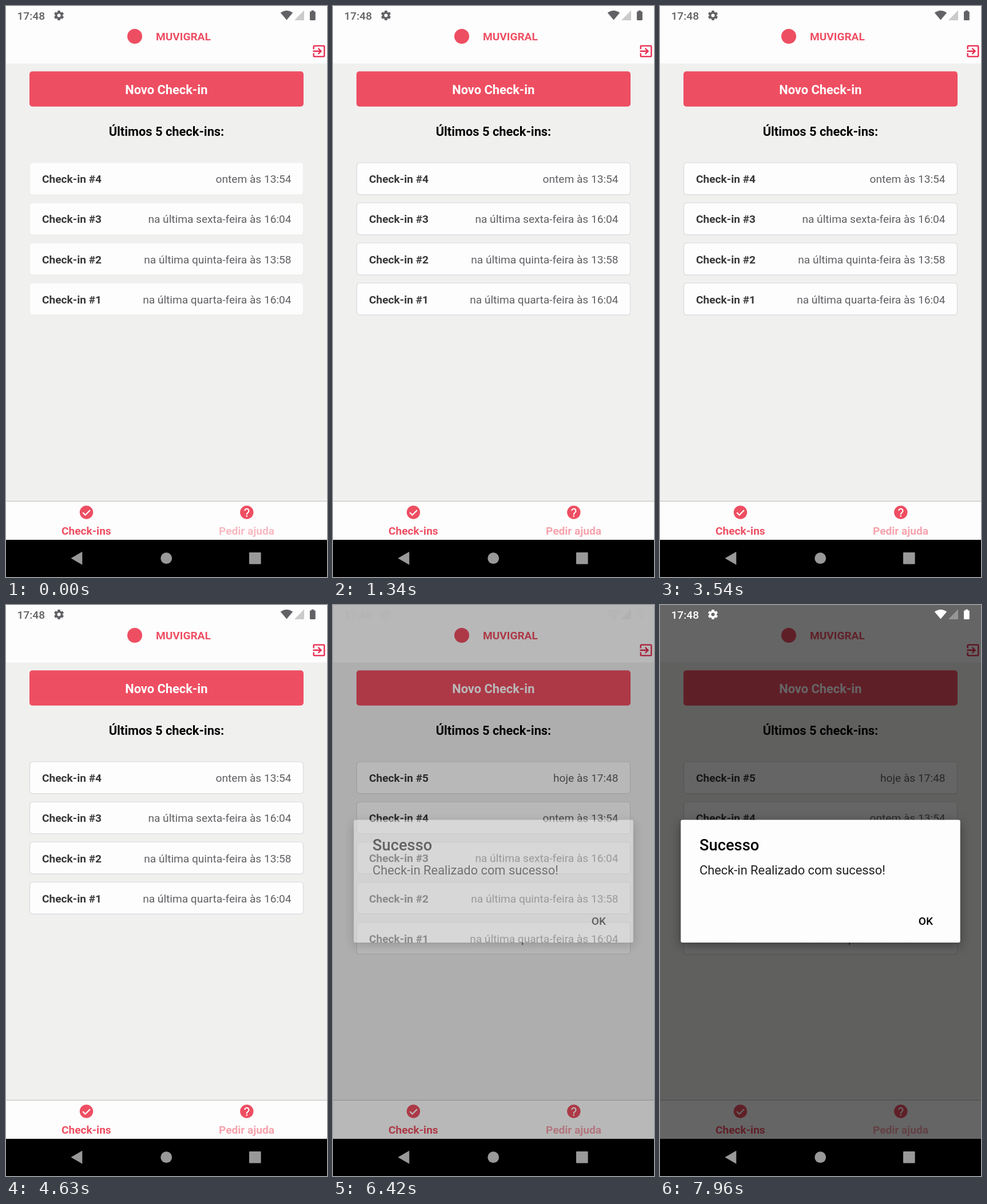
Recreate the animation shown at these times as an HTML page. Size 561x998 px, loop 8 s.

```html
<!DOCTYPE html>
<html lang="pt-BR">
<head>
<meta charset="utf-8">
<title>Check-ins</title>
<style>
  html, body { margin: 0; width: 100%; height: 100%; overflow: hidden; background: #000; }
  svg { display: block; width: 100%; height: 100%; font-family: Roboto, sans-serif; font-size: 19.11px; }
  .bold { font-weight: 700; }
  .medium { font-weight: 500; }
  .large { font-size: 21.84px; }
  .end { text-anchor: end; }
  .middle { text-anchor: middle; }
  .brand { fill: #ee4e62; }
  .card { fill: #fdfdfd; }
  .outline { fill: none; stroke: #dadade; stroke-width: 1.2; }
  #dialog rect { filter: drop-shadow(0 5px 9px rgba(0, 0, 0, .4)); }
</style>
</head>
<body>
<svg viewBox="0 0 561 998">
  <defs>
    <g id="status">
      <text class="medium" x="19.5" y="24">17:48</text>
      <path transform="translate(82.2 6.2) scale(.86)" d="M19.43 12.98c.04-.32.07-.64.07-.98s-.03-.66-.07-.98l2.11-1.65c.19-.15.24-.42.12-.64l-2-3.46c-.12-.22-.39-.3-.61-.22l-2.49 1c-.52-.4-1.08-.73-1.69-.98l-.38-2.65C14.46 2.18 14.25 2 14 2h-4c-.25 0-.46.18-.49.42l-.38 2.65c-.61.25-1.17.59-1.69.98l-2.49-1c-.23-.09-.49 0-.61.22l-2 3.46c-.13.22-.07.49.12.64l2.11 1.65c-.04.32-.07.65-.07.98s.03.66.07.98l-2.11 1.65c-.19.15-.24.42-.12.64l2 3.46c.12.22.39.3.61.22l2.49-1c.52.4 1.08.73 1.69.98l.38 2.65c.03.24.24.42.49.42h4c.25 0 .46-.18.49-.42l.38-2.65c.61-.25 1.17-.59 1.69-.98l2.49 1c.23.09.49 0 .61-.22l2-3.46c.12-.22.07-.49-.12-.64zM12 15.5a3.5 3.5 0 1 1 0-7 3.5 3.5 0 0 1 0 7z"/>
      <path d="M479.8 11.8Q490.5 4 501.2 11.8L490.5 24.6z"/>
      <path opacity=".32" d="M521 7.5V25H504z"/>
      <path d="M533.8 7.8H538V9.4H539.6Q540.8 9.4 540.8 10.6V23.8Q540.8 25 539.6 25H532.2Q531 25 531 23.8V10.6Q531 9.4 532.2 9.4H533.8z"/>
    </g>
  </defs>

  <rect width="561" height="933" fill="#f0f0ef"/>
  <rect width="561" height="100.5" fill="#fdfdfd"/>
  <use id="darkStatus" href="#status" fill="#626266"/>
  <circle class="brand" cx="225" cy="53" r="13"/>
  <text class="brand bold" x="262" y="59.8">MUVIGRAL</text>
  <path fill="#e8284e" transform="translate(533 65) scale(1.167)" d="M10.09 15.59L11.5 17l5-5-5-5-1.41 1.41L12.67 11H3v2h9.67zM19 3H5a2 2 0 0 0-2 2v4h2V5h14v14H5v-4H3v4a2 2 0 0 0 2 2h14a2 2 0 0 0 2-2V5a2 2 0 0 0-2-2z"/>

  <g id="button">
    <rect class="brand" x="41" y="114.3" width="479" height="61.4" rx="5"/>
    <text class="bold large middle" x="280.3" y="153.8" fill="#fff">Novo Check-in</text>
  </g>
  <text class="bold large middle" x="280.5" y="226.8">Últimos 5 check-ins:</text>
  <g id="list"></g>

  <rect y="865" width="561" height="68" fill="#fdfdfd"/>
  <rect y="865" width="561" height="1" fill="#bdbdbf"/>
  <g class="brand bold middle">
    <circle cx="140.5" cy="885" r="11.7"/>
    <path d="M134.2 885.3L138.6 889.7L147 881.2" fill="none" stroke="#fff" stroke-width="2.2"/>
    <text x="140.3" y="924.3">Check-ins</text>
    <circle cx="420.8" cy="885" r="11.7"/>
    <path d="M417.2 882.3a3.6 3.6 0 1 1 6 2.7q-2.4 1.8-2.4 4" fill="none" stroke="#fff" stroke-width="2.1"/>
    <rect x="419.6" y="890.4" width="2.4" height="2.3" fill="#fff"/>
    <text id="help" x="420.5" y="924.3" fill="#f6a3ad">Pedir ajuda</text>
  </g>

  <rect id="dim" width="561" height="933" fill="#000"/>
  <use id="lightStatus" href="#status" fill="#fff"/>
  <g id="dialog">
    <rect x="36.3" y="375.5" width="488.4" height="214.5" rx="3" fill="#fdfdfd"/>
    <text class="medium" x="69" y="428.8" font-size="27.3">Sucesso</text>
    <text class="large" x="69" y="471" fill="#222">Check-in Realizado com sucesso!</text>
    <text class="medium" x="451.8" y="558.8">OK</text>
  </g>

  <rect y="933" width="561" height="65"/>
  <g fill="#999">
    <path d="M113.5 965.3L133.3 953.8V976.8z"/>
    <circle cx="280.2" cy="965.2" r="9.9"/>
    <rect x="425" y="955" width="20.6" height="20.6" rx="1"/>
  </g>
</svg>
<script>
  const LOOP = 8000, ROW = 70.1, UPDATE = 6390;
  const visits = [
    'hoje às 17:48',
    'ontem às 13:54',
    'na última sexta-feira às 16:04',
    'na última quinta-feira às 13:58',
    'na última quarta-feira às 16:04'
  ];
  const byId = id => document.getElementById(id);

  byId('list').innerHTML = visits.map((when, i) => `
    <g transform="translate(0 ${i * ROW})">
      <rect class="card" x="41.5" y="274" width="478" height="55.7" rx="5"/>
      <rect class="outline" x="41.5" y="274" width="478" height="55.7" rx="5"/>
      <text class="bold" x="63" y="309.4" fill="#38383a">Check-in #${5 - i}</text>
      <text class="end" x="498.5" y="309.4" fill="#606064">${when}</text>
    </g>`).join('');

  // Each step is [time in ms, value, easing to the next step].
  function play(element, property, steps) {
    const all = [[0, steps[0][1]], ...steps, [LOOP, steps.at(-1)[1]]];
    element.animate(
      all.map(([time, value, easing = 'linear']) => ({ offset: time / LOOP, [property]: value, easing })),
      { duration: LOOP, iterations: Infinity }
    );
  }
  const jump = (before, after) => [[UPDATE, before], [UPDATE, after]];
  const fade = (from, to) => [[UPDATE, from, 'ease-out'], [6490, to]];

  document.querySelectorAll('.outline').forEach(el => play(el, 'opacity', [[0, .25], [500, 1]]));
  play(byId('help'), 'opacity', [[0, .75], [400, 1]]);
  play(byId('button'), 'opacity', [[6060, 1, 'ease-in-out'], [6150, .4, 'ease-in-out'], [6390, 1]]);
  play(byId('list'), 'transform', jump(`translateY(${-ROW}px)`, 'translateY(0px)'));
  play(byId('list').firstElementChild, 'opacity', jump(0, 1));
  play(byId('dim'), 'opacity', fade(0, .6));
  play(byId('dialog'), 'opacity', fade(0, 1));
  play(byId('lightStatus'), 'opacity', fade(0, 1));
  play(byId('darkStatus'), 'opacity', fade(1, 0));
</script>
</body>
</html>
```
